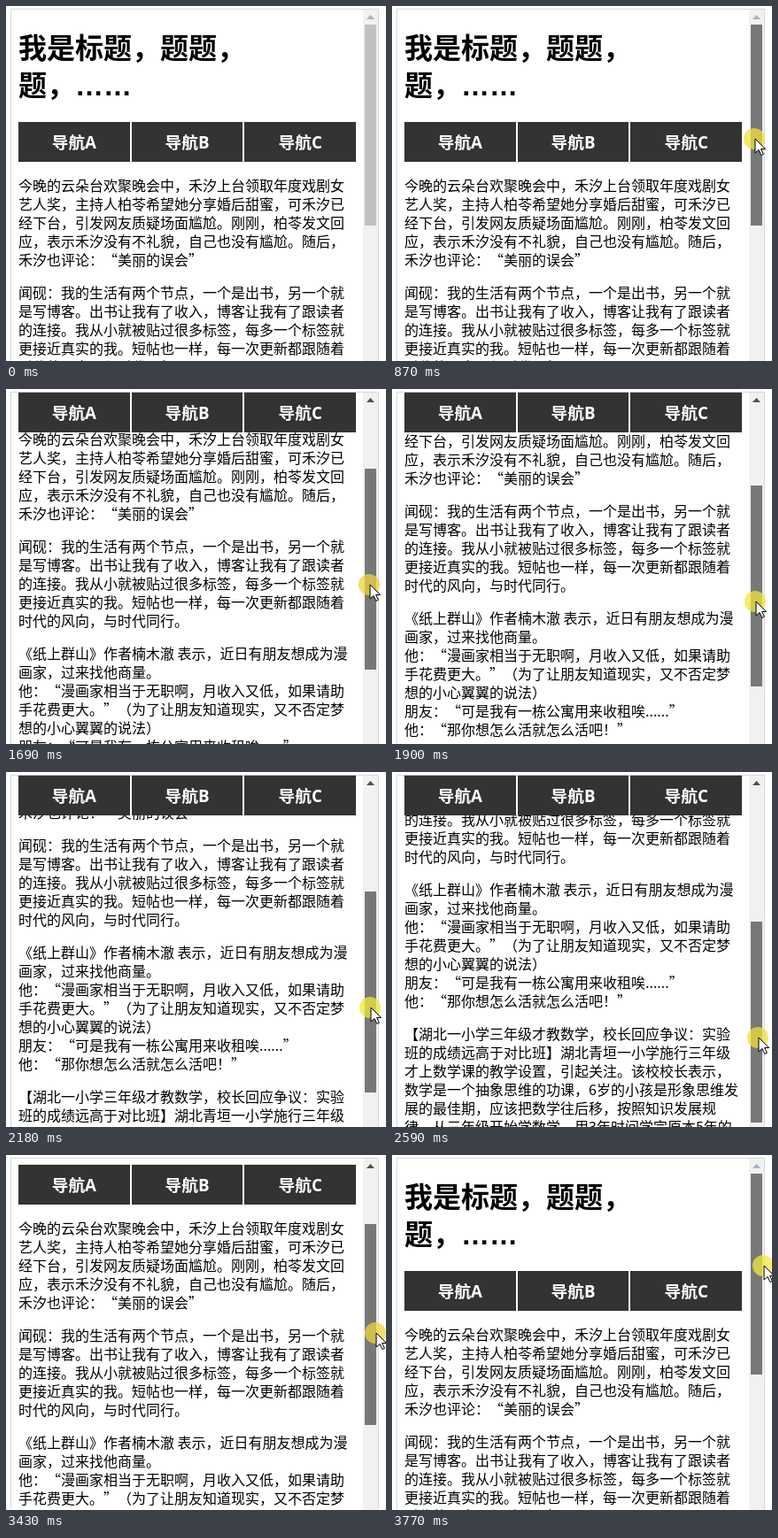
An HTML page that plays this animation: 429 px wide and 401 px high, repeating every 3.84 s.

```html
<!DOCTYPE html>
<html lang="zh-CN">
<head>
<meta charset="utf-8">
<title>Sticky navigation</title>
<style>
  html, body { margin: 0; width: 100%; height: 100%; overflow: hidden; background: #fff; }
  body { position: relative; font: 16px/21px "Noto Sans CJK SC", sans-serif; text-spacing-trim: space-all; color: #000; }
  #page { position: absolute; left: 14px; top: 4px; width: 381px; height: 397px; overflow: hidden; padding-right: 8px; }
  h1 { height: 84px; margin: 20px 0 23px; font-size: 32px; line-height: 42px; white-space: pre; }
  h1 span { font-family: "Liberation Sans", sans-serif; }
  nav { position: sticky; top: 0; display: flex; gap: 2px; height: 45px; background: #fff; }
  nav b { flex: 1; background: #333; color: #fff; text-align: center; font: bold 18.72px/45px "Open Sans", "Noto Sans CJK SC", sans-serif; }
  p { margin: 16px 0; white-space: pre; }
  p:last-child { padding-bottom: 400px; }
  svg { position: absolute; left: 0; top: 0; }
</style>
</head>
<body>
<div id="page">
<h1>我是标题，题题，
题，<span>……</span></h1>
<nav><b>导航A</b><b>导航B</b><b>导航C</b></nav>
<p>今晚的云朵台欢聚晚会中，禾汐上台领取年度戏剧女
艺人奖，主持人柏苓希望她分享婚后甜蜜，可禾汐已
经下台，引发网友质疑场面尴尬。刚刚，柏苓发文回
应，表示禾汐没有不礼貌，自己也没有尴尬。随后，
禾汐也评论：“美丽的误会”</p>
<p>闻砚：我的生活有两个节点，一个是出书，另一个就
是写博客。出书让我有了收入，博客让我有了跟读者
的连接。我从小就被贴过很多标签，每多一个标签就
更接近真实的我。短帖也一样，每一次更新都跟随着
时代的风向，与时代同行。</p>
<p>《纸上群山》作者楠木澈 表示，近日有朋友想成为漫
画家，过来找他商量。
他：“漫画家相当于无职啊，月收入又低，如果请助
手花费更大。”（为了让朋友知道现实，又不否定梦
想的小心翼翼的说法）
朋友：“可是我有一栋公寓用来收租唉......”
他：“那你想怎么活就怎么活吧！”</p>
<p>【湖北一小学三年级才教数学，校长回应争议：实验
班的成绩远高于对比班】湖北青垣一小学施行三年级
才上数学课的教学设置，引起关注。该校校长表示，
数学是一个抽象思维的功课，6岁的小孩是形象思维发
展的最佳期，应该把数学往后移，按照知识发展规
律。从三年级开始学数学，用3年时间学完原本5年的
课程是可行的，并且经过3年的实验，实验班的成绩都
远高于对比班。</p>
</div>
<svg width="429" height="401">
  <path d="M5.5 401V3.5H420.5V401" fill="none" stroke="#d8d8d8"/>
  <rect x="403" y="4" width="17" height="397" fill="#f1f1f1"/>
  <path id="arrow" d="M407 15l4.5-5 4.5 5z"/>
  <rect id="thumb" x="405" width="13" height="227"/>
  <g id="pointer">
    <circle cx="-1" r="12" fill-opacity=".75"/>
    <path d="M0 0v16l4-3.5 2.8 6 2.6-1.2-2.8-5.8h5z" fill="#fff" stroke="#000"/>
  </g>
</svg>
<script>
const LOOP = 3840, TICK = 70;
const PRESS = 12, TRACK_TOP = 21, GRAB_Y = 150, SCROLL_RATIO = 2.11;
const POINTER_LEAD = 0.3; // the page trails the pointer by this many ticks
const $ = id => document.getElementById(id);
const page = $('page'), arrow = $('arrow'), thumb = $('thumb'), pointer = $('pointer');
const halo = pointer.querySelector('circle');

// Pointer distance below the grab point: [tick, pixels]
const pull = [[0, 281], [8, 0], [14, 0], [19, 21.3], [24, 69], [31, 114],
  [40, 165], [43, 165], [44, 159], [53, -25], [56, -25]];

function pullAt(tick) {
  const i = pull.findLastIndex(([start]) => start <= tick);
  const [t0, p0] = pull[i], [t1, p1] = pull[i + 1];
  return p0 + (p1 - p0) * (tick - t0) / (t1 - t0);
}

function draw(now) {
  const tick = Math.floor(now % LOOP / TICK);
  const dragging = tick >= PRESS;
  const offset = dragging ? Math.max(0, pullAt(tick)) : 0;
  const drift = Math.max(0, (tick - PRESS) / 41) ** 2;
  const x = Math.round(410 + 10 * drift);
  const y = Math.round(GRAB_Y + pullAt(tick + POINTER_LEAD));
  const hovering = tick > 0 && y < TRACK_TOP + 227;
  const warmth = dragging ? Math.cos(Math.PI * (tick - 19) / 25) ** 4 : 0;

  page.scrollTop = Math.round(offset * SCROLL_RATIO);
  arrow.setAttribute('fill', offset ? '#505050' : '#a3b4c2');
  thumb.setAttribute('y', Math.round(TRACK_TOP + offset));
  thumb.setAttribute('fill', dragging ? '#787878' : hovering ? '#a8a8a8' : '#c1c1c1');
  pointer.setAttribute('transform', `translate(${x} ${y})`);
  pointer.setAttribute('visibility', tick ? 'visible' : 'hidden');
  halo.setAttribute('fill', `rgb(240 ${235 - 55 * warmth} 60)`);
}

function frame() {
  draw(performance.now());
  requestAnimationFrame(frame);
}
frame();
</script>
</body>
</html>
```
